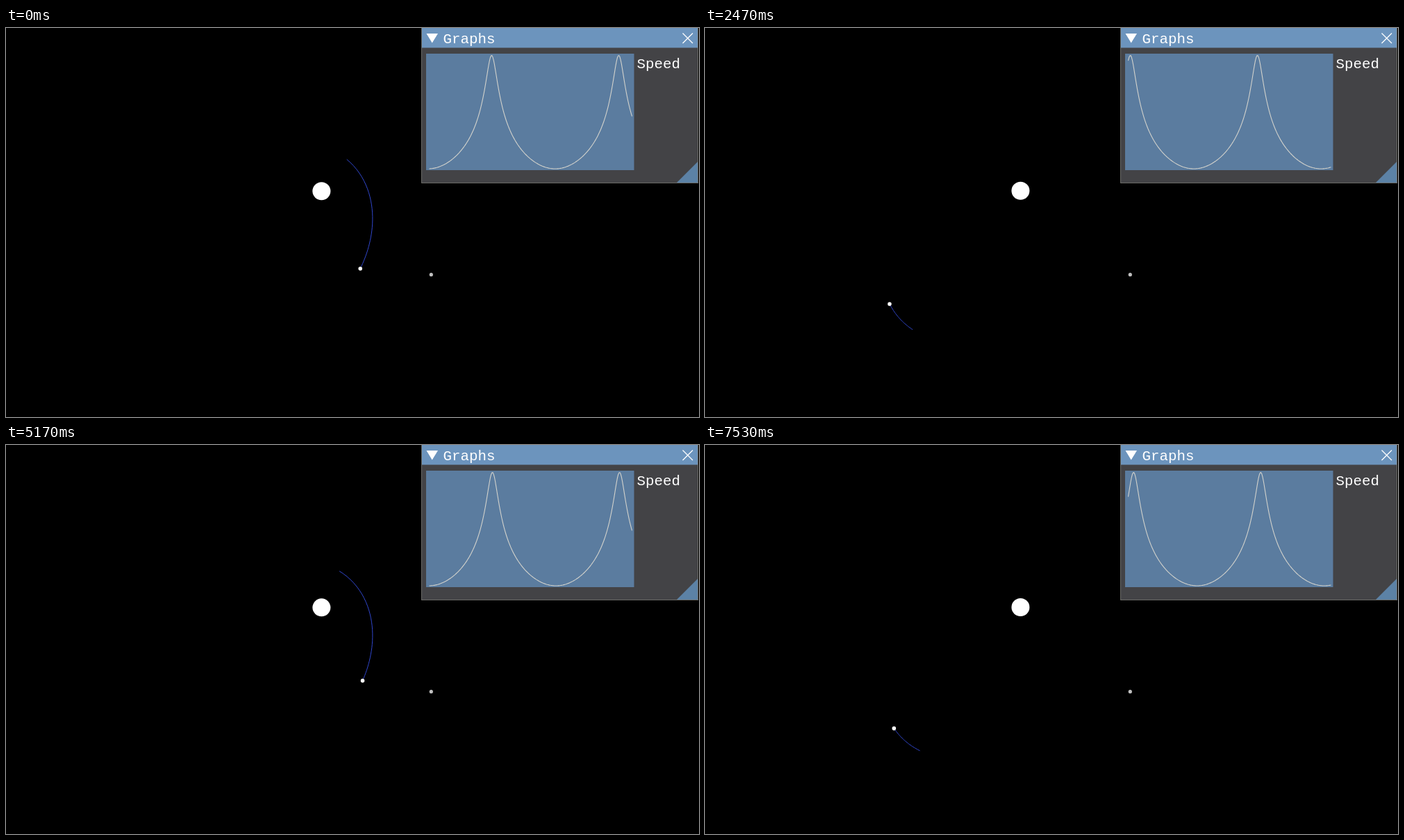
Write an HTML page that moves like this. It is 998 px wide and 561 px high and loops after 7560 ms.

```html
<!DOCTYPE html>
<html lang="en">
<head>
<meta charset="utf-8">
<title>Orbit</title>
<style>
  html, body { margin: 0; width: 100%; height: 100%; overflow: hidden; background: #000; }
  svg { display: block; }
  text { font: 20.8px "Liberation Mono", monospace; fill: #fff; }
</style>
</head>
<body>
<svg width="998" height="561" viewBox="0 0 998 561">
  <rect width="998" height="561" fill="#000"/>
  <path id="trail" fill="none" stroke="#3046cc" stroke-width="1"/>
  <circle id="sun" cx="454.4" r="13" fill="#fff"/>
  <circle cx="612.3" cy="355.7" r="2.6" fill="#c0c0c0"/>
  <circle id="planet" r="2.8" fill="#fff"/>

  <rect x="598" y="0" width="399" height="224" fill="#434346"/>
  <rect x="598" y="0" width="399" height="28.5" fill="#6c94bd"/>
  <path d="M997 192V224H965Z" fill="#5c82a6"/>
  <path d="M598.5 0V223.5H996.5V0" fill="none" stroke="#6a6a66"/>
  <path d="M605.5 8H622L613.7 21.5Z" fill="#fff"/>
  <path d="M974.5 7.5L989 22M989 7.5L974.5 22" stroke="#fff" stroke-width="1.3"/>
  <text x="629.5" y="21.5">Graphs</text>
  <rect x="605" y="37" width="299.5" height="168" fill="#5b7c9f"/>
  <path id="plot" fill="none" stroke="#d2d2cc" stroke-width="1.1"/>
  <text x="908.5" y="57.5">Speed</text>
</svg>
<script>
const LOOP = 7560, FRAME = 100 / 3;
const PERIOD = 5200, PHASE = 543, TRAIL = 548;
const orbit = { x: 454.2, y: 235, a: 156, e: 0.6257, tilt: -0.861 };
const graph = { left: 609.5, right: 901.5, top: 39.5, bottom: 203, rate: 0.0352 };
const minor = orbit.a * Math.sqrt(1 - orbit.e ** 2);
const el = id => document.getElementById(id);
const sun = el('sun'), planet = el('planet'), trail = el('trail'), plot = el('plot');

// Kepler's equation; time is measured from closest approach
function eccentricAnomaly(time) {
  const turn = time / PERIOD;
  const mean = 2 * Math.PI * (turn - Math.round(turn));
  let E = mean + orbit.e * Math.sin(mean);
  for (let i = 0; i < 8; i++) {
    E -= (E - orbit.e * Math.sin(E) - mean) / (1 - orbit.e * Math.cos(E));
  }
  return E;
}

function position(time) {
  const E = eccentricAnomaly(time);
  const u = orbit.a * (Math.cos(E) - orbit.e), v = minor * Math.sin(E);
  const c = Math.cos(orbit.tilt), s = Math.sin(orbit.tilt);
  return [orbit.x + u * c - v * s, orbit.y + u * s + v * c];
}

function speed(time) {
  const k = orbit.e * Math.cos(eccentricAnomaly(time));
  return Math.sqrt((1 + k) / (1 - k));
}

const fastest = speed(0), slowest = speed(PERIOD / 2);

function polyline(count, pointAt) {
  const points = Array.from({ length: count + 1 }, (_, i) =>
    pointAt(i / count).map(n => n.toFixed(2)).join(' '));
  return 'M' + points.join('L');
}

function plotPoint(now, f) {
  const x = graph.left + f * (graph.right - graph.left);
  const level = (speed(now - (graph.right - x) / graph.rate) - slowest) / (fastest - slowest);
  return [x, graph.bottom - level * (graph.bottom - graph.top)];
}

function render(ms) {
  const tick = Math.floor(ms % LOOP / 10) * 10;
  const t = Math.floor((tick + 3.34) / FRAME) * FRAME;
  const now = t + PHASE;
  const [x, y] = position(now);
  planet.setAttribute('cx', x);
  planet.setAttribute('cy', y);
  sun.setAttribute('cy', 235.2 - t * 0.00016);
  trail.setAttribute('d', polyline(32, f => position(now - TRAIL * (1 - f))));
  plot.setAttribute('d', polyline(249, f => plotPoint(now, f)));
}

const start = performance.now();
function loop() {
  render(performance.now() - start);
  requestAnimationFrame(loop);
}
loop();
</script>
</body>
</html>
```
